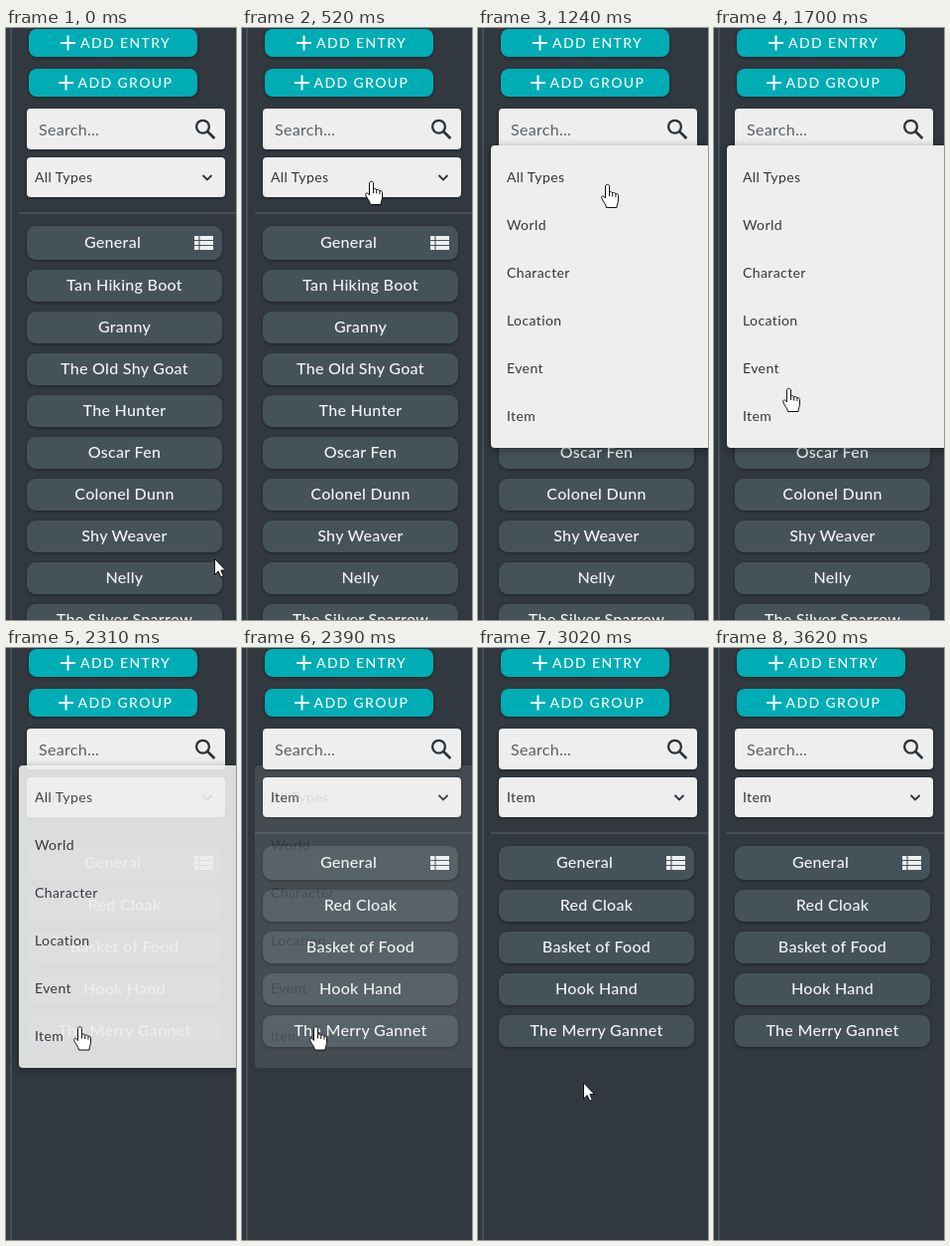
An HTML page for the animation above (5390 ms loop, 232 by 595 pixels).

```html
<!DOCTYPE html>
<html lang="en">
<head>
<meta charset="utf-8">
<title>Entry filter</title>
<style>
html, body { margin: 0; width: 100%; height: 100%; overflow: hidden; background: #31383f; }
svg { display: block; width: 232px; height: 595px; font-family: Lato, "Open Sans", sans-serif; }
.cta { font-size: 14px; font-weight: 500; letter-spacing: 1.4px; fill: #f4ffff; }
.big { font-size: 16px; letter-spacing: .3px; }
.row { font-weight: 500; fill: #f2f4f5; text-anchor: middle; }
.small { font-size: 14px; letter-spacing: .4px; fill: #33373b; }
.raised { filter: drop-shadow(0 1px 1.5px rgba(0, 0, 0, .4)); }
.panel { filter: drop-shadow(0 2px 4px rgba(0, 0, 0, .4)); }
</style>
</head>
<body>
<svg id="stage" viewBox="0 0 232 595">
  <rect width="232" height="595" fill="#31383f"/>
  <path d="M5 0V595M13 186H232" stroke="#474e57" stroke-width="2"/>

  <g class="raised" fill="#00adb5">
    <rect x="23" y="1" width="170" height="28" rx="8"/>
    <rect x="23" y="41" width="170" height="28" rx="8"/>
  </g>
  <path d="M55 15H70M62.500 7.500V22.500M53 55H68M60.500 47.500V62.500" stroke="#f4ffff" stroke-width="2"/>
  <text class="cta" x="75" y="20">ADD ENTRY</text>
  <text class="cta" x="72.500" y="60">ADD GROUP</text>

  <g class="raised" fill="#eee">
    <rect x="21" y="81" width="200" height="41" rx="4"/>
    <rect x="21" y="130" width="200" height="40" rx="4"/>
  </g>
  <text class="big" x="33" y="108" fill="#5a5f64">Search...</text>
  <g fill="none" stroke="#2b333a">
    <circle cx="198.500" cy="99.200" r="6.400" stroke-width="2.300"/>
    <path d="M203 103.700L210.300 111" stroke-width="2.700"/>
    <path d="M198.500 148L203 152.500L207.500 148" stroke-width="1.800"/>
  </g>
  <text class="small" id="choice" x="29" y="155"></text>

  <g id="allList"></g>
  <g id="itemList"></g>
  <g id="listIcon" fill="#eef0f1"></g>

  <g id="menu">
    <rect class="panel" id="sheet" x="13" width="252" rx="4" fill="#eee"/>
    <g id="options"></g>
  </g>

  <g id="cursor" stroke-linejoin="round">
    <path id="arrow" d="M0 0V16L3.700 12.500L6.200 18.300L8.800 17.200L6.400 11.500H11Z" fill="#fff" stroke="#111"/>
    <g id="hand" stroke="#111">
      <path d="M-2 2C-2 -.3 2 -.3 2 2V8.200C2.600 7.200 4.900 7.400 5.200 9C6 8 8.200 8.400 8.400 10C9.200 9.200 11 9.700 11 11.500V16C11 18.500 9.500 20 9.500 23.500H-1C-1.300 20 -5.200 16.500 -5.800 13.800C-6.200 11.600 -4 11 -2 14Z" fill="#fff"/>
      <path d="M2 8V12M5.200 9V12.500M8.400 10V13"/>
    </g>
  </g>
</svg>
<script>
const LOOP = 5390, OPEN = 971.5, PICK = 2300;
const $ = id => document.getElementById(id);

function add(parent, tag, attrs, text = '') {
  const el = document.createElementNS('http://www.w3.org/2000/svg', tag);
  for (const k in attrs) el.setAttribute(k, attrs[k]);
  el.textContent = text;
  parent.append(el);
  return el;
}

// The first row is taller and leaves room for its icon
const rowTop = i => i ? 201 + 42 * i : 199;
const rowHeight = i => i ? 32 : 34;
const labelX = i => i ? 119.5 : 107.5;

function buildList(parent, names) {
  names.forEach((name, i) => {
    const y = rowTop(i), height = rowHeight(i);
    add(parent, 'rect', { class: 'raised', x: 21, y, width: 197, height, rx: 9, fill: '#46525a' });
    add(parent, 'text', { class: 'big row', x: labelX(i), y: y + height / 2 + 5 }, name);
  });
}

const allNames = ['General', 'Tan Hiking Boot', 'Granny', 'The Old Shy Goat', 'The Hunter',
  'Oscar Fen', 'Colonel Dunn', 'Shy Weaver', 'Nelly', 'The Silver Sparrow'];
const itemNames = ['General', 'Red Cloak', 'Basket of Food', 'Hook Hand', 'The Merry Gannet'];
buildList($('allList'), allNames);
buildList($('itemList'), itemNames);

for (const y of [209, 214, 219]) {
  add($('listIcon'), 'rect', { x: 190, y, width: 4.4, height: 4 });
  add($('listIcon'), 'rect', { x: 195.5, y, width: 13.5, height: 4 });
}

const options = ['All Types', 'World', 'Character', 'Location', 'Event', 'Item'].map((name, i) =>
  add($('options'), 'text', { class: 'small', x: 29, y: 155 + 48 * i }, name));

const ticks = [0, 70, 145, 220, 295, 370, 445, 520, 770, 850, 940, 1020, 1080, 1160, 1240,
  1310, 1390, 1470, 1550, 1620, 1700, 1780, 1850, 2010, 2090, 2310, 2390, 2480,
  2770, 2850, 2930, 3020, 3080, 3160, 3240, 3310, 3390, 3470, 3550, 3620];

// Pointer path: time, x, y
const path = [[0, 210.5, 533.5], [520, 130.5, 154], [1080, 130.5, 154], [1240, 130.5, 157], [1700, 75.5, 362],
  [1780, 74.5, 373], [1850, 74.5, 375], [2090, 74.5, 380.5], [2690, 74.5, 380.5],
  [3020, 106.5, 437], [3240, 163, 498], [3550, 214, 592], [3620, 222, 610]];

const clamp = v => Math.min(1, Math.max(0, v));
const smooth = u => u * u * (3 - 2 * u);

function pointer(t) {
  let i = 0;
  while (i < path.length - 2 && t >= path[i + 1][0]) i++;
  const [t0, x0, y0] = path[i], [t1, x1, y1] = path[i + 1];
  let u = clamp((t - t0) / (t1 - t0));
  if (i === 0) u = smooth(u);
  return [x0 + (x1 - x0) * u, y0 + (y1 - y0) * u];
}

// y of cubic-bezier(.25, .8, .25, 1)
function easeOut(x) {
  let lo = 0, hi = 1;
  for (let k = 0; k < 20; k++) {
    const s = (lo + hi) / 2, r = 1 - s;
    if (.75 * r * r * s + .75 * r * s * s + s ** 3 < x) lo = s; else hi = s;
  }
  const r = 1 - lo;
  return 2.4 * r * r * lo + 3 * r * lo * lo + lo ** 3;
}

function clickable(x, y, menuOpen, names) {
  if (menuOpen) return true;
  if (x < 21 || x > 218) return false;
  if (y >= 130 && y <= 170) return true;
  return names.some((_, i) => y >= rowTop(i) && y <= rowTop(i) + rowHeight(i));
}

const show = (id, on) => $(id).setAttribute('display', on ? 'inline' : 'none');

function draw(time) {
  const t = ticks.filter(k => k <= time).pop();
  const picked = t >= PICK;
  $('choice').textContent = picked ? 'Item' : 'All Types';
  show('allList', !picked);
  show('itemList', picked);

  const alpha = 1 - clamp((t - PICK) / 100);
  const menuOpen = t >= OPEN && alpha > 0;
  show('menu', menuOpen);
  const scale = easeOut(clamp((t - OPEN) / 150));
  $('menu').setAttribute('opacity', alpha);
  $('sheet').setAttribute('y', 128.7 - 10.7 * scale);
  $('sheet').setAttribute('height', 304 * scale);
  const fade = clamp((t - OPEN - 100) / 150);
  options.forEach((el, i) => el.setAttribute('opacity', i ? fade : 1));

  const [x, y] = pointer(t);
  const hand = clickable(x, y, menuOpen, picked ? itemNames : allNames);
  show('hand', hand);
  show('arrow', !hand);
  show('cursor', t < 3620);
  $('cursor').setAttribute('transform', `translate(${x} ${y})`);
}

const start = performance.now();
function frame() {
  draw((performance.now() - start) % LOOP);
  requestAnimationFrame(frame);
}
frame();
</script>
</body>
</html>
```
